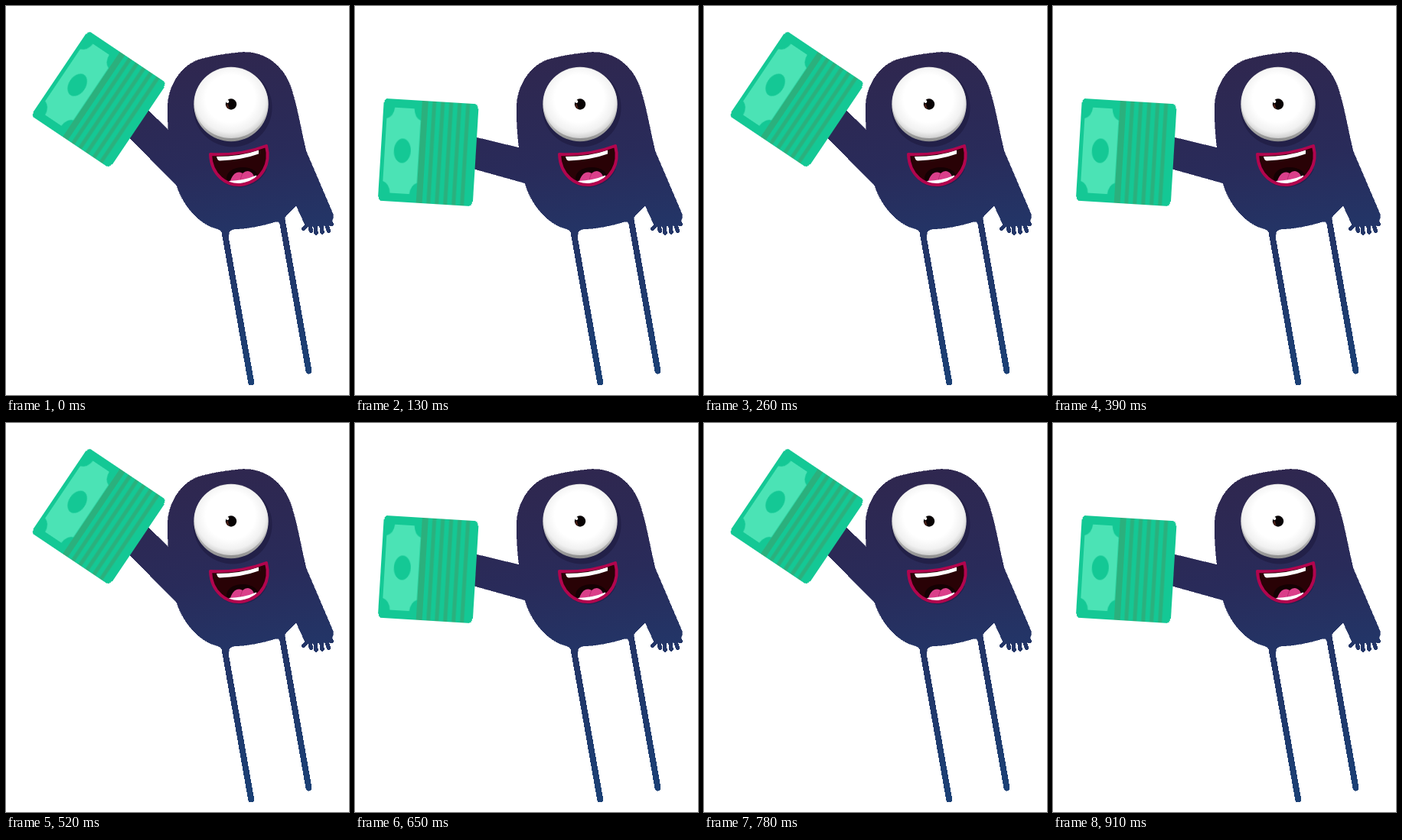
Write an HTML page that moves like this. It is 448 px wide and 509 px high and loops after 6.24 s.

```html
<!DOCTYPE html>
<html lang="en">
<head>
<meta charset="utf-8">
<title>Waving money</title>
<style>
  html, body { margin: 0; width: 100%; height: 100%; overflow: hidden; background: #fff; }
  svg { display: block; width: 100%; height: 100%; }
  .hard { shape-rendering: crispEdges; }
  .skin { fill: url(#skin); stroke: url(#skin); stroke-width: .6; }
  .limb { fill: none; stroke: url(#skin); stroke-linecap: round; }
  .money { transform-origin: 236px 204px; animation: swing 6240ms step-end infinite; }
  .raised { animation: raised 6240ms step-end infinite; }
  .level { animation: level 6240ms step-end infinite; }
  /* one beat is 130ms, or 1/48 of the loop */
  @keyframes swing {
    0%, 4.1666%, 8.3333%, 12.5% { transform: rotate(30.4deg); }
    2.0833%, 6.25%, 10.4166%, 14.5833%, 100% { transform: rotate(0deg); }
  }
  @keyframes raised {
    0%, 4.1666%, 8.3333%, 12.5% { opacity: 1; }
    2.0833%, 6.25%, 10.4166%, 14.5833%, 100% { opacity: 0; }
  }
  @keyframes level {
    0%, 4.1666%, 8.3333%, 12.5% { opacity: 0; }
    2.0833%, 6.25%, 10.4166%, 14.5833%, 100% { opacity: 1; }
  }
</style>
</head>
<body>
<svg viewBox="0 0 448 509" preserveAspectRatio="none">
  <defs>
    <linearGradient id="skin" gradientUnits="userSpaceOnUse" x1="290" y1="60" x2="365" y2="495">
      <stop offset="0" stop-color="#2f274f"/>
      <stop offset=".32" stop-color="#292b5a"/>
      <stop offset=".55" stop-color="#233567"/>
      <stop offset="1" stop-color="#1b4176"/>
    </linearGradient>
    <linearGradient id="rim" x2="0" y2="1">
      <stop offset=".5" stop-color="#d8d8d8"/>
      <stop offset="1" stop-color="#8f8f8f"/>
    </linearGradient>
    <radialGradient id="ball" cx=".49" cy=".44" r=".56">
      <stop offset=".6" stop-color="#fff"/>
      <stop offset=".85" stop-color="#f1f1f1"/>
      <stop offset="1" stop-color="#cfcfcf"/>
    </radialGradient>
    <clipPath id="lips">
      <path d="M267 194 Q306 196 340 183 C346 206 335 228 310 233.5 C288 237 268 221 267 194Z"/>
    </clipPath>
  </defs>

  <!-- waving arm -->
  <g class="skin hard">
    <path class="raised" d="M180 131 L217 167 L250 200 L240 235 L223 235 L155 166Z"/>
    <path class="level" d="M150 170 L216 186 L250 195 L250 238 L223 232 L148 211Z"/>
  </g>

  <g class="money">
    <g transform="translate(95.75 191.5) rotate(3.5)">
      <rect class="hard" x="-61.7" y="-67.3" width="123.2" height="134.6" rx="6" fill="#14c895"/>
      <path d="M-8 -67V67" stroke="#2bb07d" stroke-width="8"/>
      <path d="M4 -67V67M15 -67V67M26 -67V67M37 -67V67M48 -67V67" stroke="#2bb07d" stroke-width="5"/>
      <path d="M-47 -56H-21.5Q-20.5 -44 -12.5 -41V41Q-20.5 44 -21.5 56H-47Q-48 44 -57 41V-41Q-48 -44 -47 -56Z" fill="#4be3b5"/>
      <ellipse cx="-34" rx="11" ry="16" fill="#14c895"/>
    </g>
  </g>

  <!-- body, resting arm and legs -->
  <path class="skin hard" d="M211 132 C212 104 228 79 251 70.5 C270 65 290 62 309 60.5
    C339 59.5 362 78 372 106 C381 133 385 162 392 190
    L427 272 Q428.5 279 424 283 L423 287 L390 289 L390 285
    L379 261 Q372 268 366 274 Q362 278 365 290 L359.5 291 Q358 281 353 282
    Q324 291 298 292 Q289 293 291 304 L284 305 Q284 294 277 292
    C252 286 231 261 223 235 C216 208 211 168 211 132Z"/>
  <path class="limb hard" stroke-width="8" d="M285.4 295L320.2 492.5M361 282L395.5 477.5"/>
  <path class="limb hard" stroke-width="5.5"
    d="M392 288L388.5 291.5M397 288L398.5 294.5M404 288L405 297M412 288L413 296M418.5 286L421.5 294M423 280L425 285.5"/>

  <!-- eye -->
  <circle cx="296" cy="133" r="51.5" fill="#211f46" opacity=".85"/>
  <circle cx="294" cy="128.5" r="48.7" fill="url(#rim)"/>
  <ellipse cx="294" cy="126.7" rx="48" ry="46.3" fill="url(#ball)"/>
  <circle cx="294" cy="128.5" r="7.2" fill="#080304"/>
  <path d="M287.5 129 Q288 134 292 134.5 Q290 131 290 128Z" fill="#4a2018"/>
  <circle cx="289.3" cy="125" r="2" fill="#fff"/>

  <!-- mouth -->
  <path d="M272 218 Q286 239 309 237 Q332 233 341 213Z" fill="#1f1c42" opacity=".6"/>
  <g clip-path="url(#lips)">
    <rect x="262" y="178" width="86" height="60" fill="#290206"/>
    <ellipse cx="309" cy="225" rx="21" ry="14" fill="#140103"/>
    <path d="M275 197 Q307 197 330 188.5 L330 193.5 Q308 201.5 279 202.5 Q276 202 275 197Z" fill="#fff"/>
    <path d="M292 232 Q296 217.5 304 217.5 Q307 217 309 219 Q314 214.5 319 217 Q324 219 326 230Z" fill="#da3f8a"/>
    <path d="M309 219 Q307 223 306 228" fill="none" stroke="#b92a6e"/>
    <path d="M291 229 Q311 228.5 327 221.5 L328 227 Q310 234 293 231.5Z" fill="#fff"/>
  </g>
  <path d="M267 194 Q306 196 340 183 C346 206 335 228 310 233.5 C288 237 268 221 267 194Z"
    fill="none" stroke="#b2054e" stroke-width="4" stroke-linejoin="round"/>
</svg>
</body>
</html>
```
